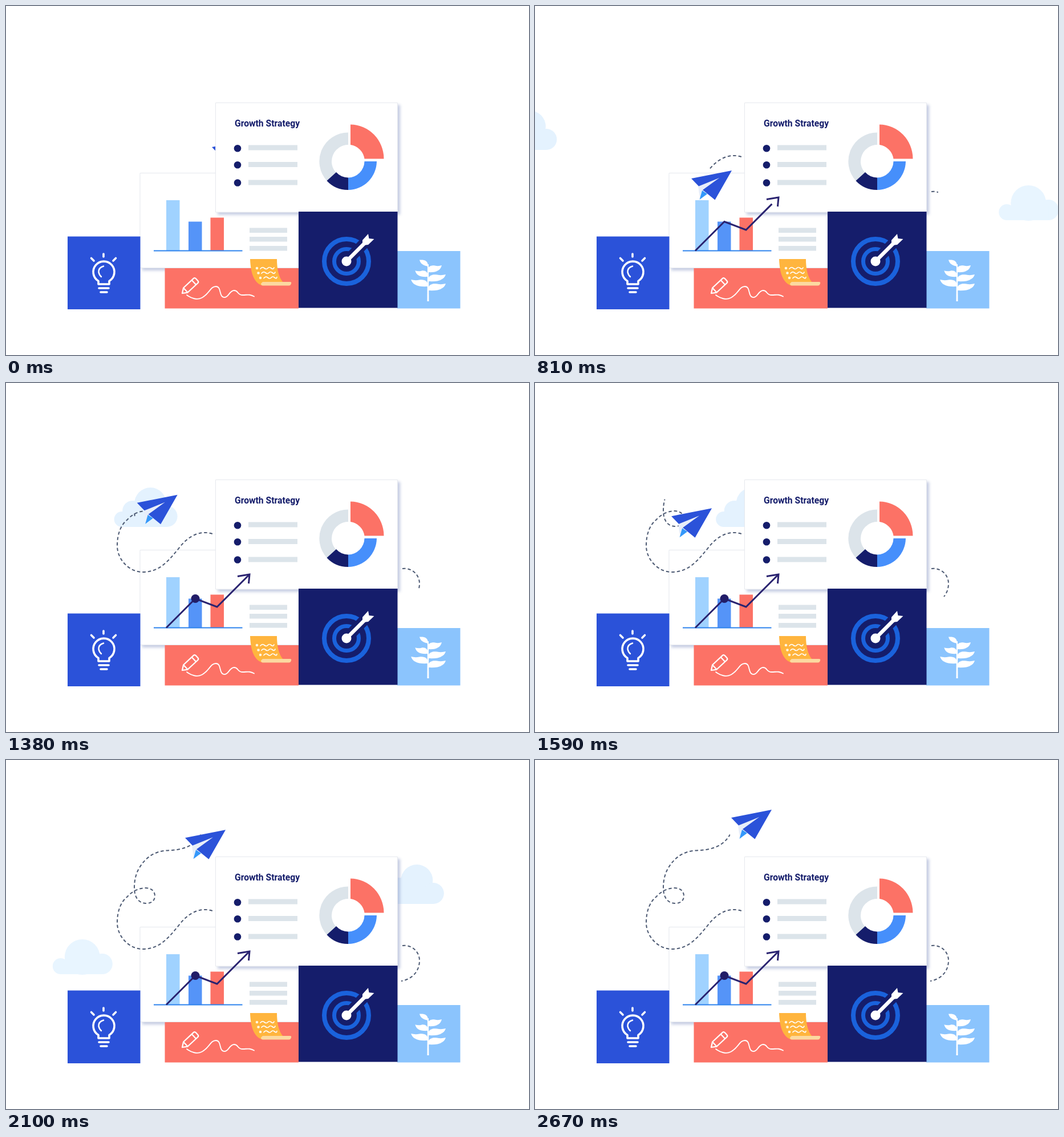
These frames come from a looping animation (917x611 px, 2700 ms). An HTML page:

```html
<!DOCTYPE html>
<html lang="en">
<head>
<meta charset="utf-8">
<title>Growth Strategy</title>
<style>
  html, body { margin: 0; width: 100%; height: 100%; overflow: hidden; background: #fff; }
  svg { display: block; width: 917px; height: 611px; }
  .navy { fill: #151d6b; }
  .red { fill: #fc7266; }
  .grey { fill: #dce4ea; }
  .card { fill: #fff; stroke: #e6e9ee; filter: url(#shadow); }
  .white { fill: none; stroke: #fff; stroke-linecap: round; stroke-linejoin: round; }
  .dash { fill: none; stroke: #4d5a73; stroke-width: 2; stroke-dasharray: 5.5 4; }
  .reveal { fill: none; stroke: #fff; stroke-width: 7; }
  .trend { fill: none; stroke: #2a2370; stroke-width: 3; }
</style>
</head>
<body>
<svg viewBox="0 0 917 611">
  <defs>
    <filter id="shadow" x="-5%" y="-5%" width="112%" height="115%">
      <feDropShadow dx="4" dy="4" stdDeviation="2.500" flood-color="#6f7fb8" flood-opacity=".4"/>
    </filter>
    <path id="route" d="M362 264C343 258 322 265 305 287C285 311 270 331 240 331C215 331 195 308 195 285C195 262 203 247 212 240C222 229 234 224 245 224C256 224 261 231 261 238C261 246 255 251 246 251C234 251 225 242 225 224C225 212 227 203 231 194C238 180 249 168 262 163C275 157 288 159 300 157C318 154 332 147 341 132L345 118"/>
    <path id="arc" d="M695 325C712 323 725 336 725 351C725 370 712 384 693 387"/>
    <mask id="routeMask" maskUnits="userSpaceOnUse" x="0" y="0" width="917" height="611">
      <use href="#route" id="routeReveal" class="reveal"/>
    </mask>
    <mask id="arcMask" maskUnits="userSpaceOnUse" x="0" y="0" width="917" height="611">
      <use href="#arc" id="arcReveal" class="reveal"/>
    </mask>
    <path id="leaf" d="M0 0C-2 -10 5 -13 12 -11.500Q18 -10 24 -12C22 -3 14 1 0 0Z"/>
    <path id="bullets" d="M425 243.500h86v9h-86ZM425 273h86v9h-86ZM425 304.500h86v9h-86Z"/>
  </defs>

  <g id="cloudA" fill="#e4f2fe">
    <circle cx="14" cy="238.500" r="13.500"/><circle cx="33" cy="224" r="18"/>
    <circle cx="64" cy="211" r="28"/><circle cx="93" cy="233.500" r="18.500"/>
    <path d="M14 252V225H93V252Z"/>
  </g>
  <g id="cloudB" fill="#e8f5ff">
    <circle cx="14" cy="361" r="14"/><circle cx="52" cy="345" r="31"/>
    <circle cx="87" cy="357" r="18"/><path d="M14 375V350H87V375Z"/>
  </g>

  <!-- Chart card -->
  <path class="card" d="M235 292.500H513V458.500H235Z"/>
  <path fill="#a0d2ff" d="M281 340H304.500V428H281Z"/>
  <path fill="#5594f8" d="M320 377.500H343.500V428H320Z"/>
  <path class="red" d="M358.500 370.500H382V428H358.500Z"/>
  <path stroke="#2f83ee" stroke-width="2" d="M259 428.500H414.500"/>
  <path class="grey" d="M427 388.500h66v8.500h-66ZM427 404h66v8.500h-66ZM427 420h66v8.500h-66Z"/>

  <!-- Base tiles -->
  <path fill="#2b52d9" d="M108 403.500H235.500V531H108Z"/>
  <path class="red" d="M278.500 459H513V529.500H278.500Z"/>
  <path fill="#8bc4fd" d="M686 429H796.500V529.500H686Z"/>

  <!-- Bulb -->
  <g class="white" stroke-width="3.600">
    <path d="M162 487V481.500A18.500 18.500 0 1 1 181 481.500V487ZM163 494H180M166 501H177"/>
    <path d="M171 434V439M149.500 441.500L154 446M192.500 441.500L188 446"/>
    <path stroke-width="2.500" d="M171 455.500Q162 458 162.500 466Q163.500 471 167 474"/>
  </g>

  <!-- Plant -->
  <g fill="#fff">
    <path d="M738.500 517L739 452H741L741.500 517Z"/>
    <path d="M740 456C740 446 735 444 725 444.500C727 452 732 454 740 456Z"/>
    <use href="#leaf" transform="translate(740 466)"/>
    <use href="#leaf" transform="translate(741 482) scale(1.250 1)"/>
    <use href="#leaf" transform="translate(741 498) scale(1.250 1)"/>
    <use href="#leaf" transform="translate(739 474) scale(-.9 .9)"/>
    <use href="#leaf" transform="translate(739 491) scale(-1.200 1)"/>
  </g>

  <!-- Pencil and scribble -->
  <g class="white" stroke-width="1.800">
    <path d="M317 506C325 512 335 515 343 511C357 504 358 491 368 491C379 491 372 511 384 510C391 509 392 498 400 498C408 498 405 506 415 506C423 506 427 504 435 508.500"/>
    <path stroke-width="2.200" transform="translate(309 503) rotate(-43)" d="M0 0L8 -5.500H32Q35 -5.500 35 -2.500V2.500Q35 5.500 32 5.500H8ZM8 -5.500V5.500M28 -5.500V5.500"/>
  </g>

  <!-- Note -->
  <path fill="#ffb53e" d="M428 443H475C475 460 478 475 486 484L450 489.500C436 486 429 470 428 443Z"/>
  <path fill="#fcd9a0" d="M450 483H498Q501 483 500 486Q499 489.500 496 489.500H451Q447 489.500 447 486Z"/>
  <g fill="#fff6df">
    <circle cx="440" cy="459" r="2.300"/><circle cx="442.500" cy="467.500" r="2.300"/><circle cx="446" cy="476" r="2.300"/>
  </g>
  <path class="white" stroke-width="1.700" d="M446 460q3.500 -4 7 -1t6 0t6 0t5 -1M448 468q3.500 -4 7 -1t6 0t6 0t5 -1M452 476.500q3.500 -4 7 -1t6 0t6 0t4 -1"/>

  <!-- Flight -->
  <use href="#route" class="dash" mask="url(#routeMask)"/>
  <use href="#arc" class="dash" mask="url(#arcMask)"/>
  <g id="plane">
    <path fill="#e8eef9" d="M-59 27L-20 12L-50 38L-56 50Z"/>
    <path fill="#3498fa" d="M-56.500 51L-52 35L-43 41Z"/>
    <path fill="#2b52d9" d="M0 0L-71 14L-58 27.500L-22 13L-51 34L-29.500 51.500Z"/>
  </g>

  <!-- Strategy card -->
  <path class="card" d="M367.500 169.500H686.500V361H367.500Z"/>
  <text class="navy" x="401" y="210.500" font-family="Roboto, Arial, sans-serif" font-weight="700" font-size="15.700">Growth Strategy</text>
  <g class="navy"><circle cx="406" cy="249.300" r="6.300"/><circle cx="406" cy="278.300" r="6.300"/><circle cx="406" cy="309.500" r="6.300"/></g>
  <use href="#bullets" class="grey"/>
  <path class="grey" d="M600 221.500A50.500 50.500 0 0 0 563 306.500L579.500 292.500A29 29 0 0 1 600 243Z"/>
  <path class="navy" d="M562.500 306A50.500 50.500 0 0 0 600 322V300.500A29 29 0 0 1 579 291Z"/>
  <path fill="#468ffb" d="M600 322A50.500 50.500 0 0 0 650 272H628.500A29 29 0 0 1 600 300.500Z"/>
  <path class="red" d="M604 207.500A59 60 0 0 1 662.500 267.500H628.500A29 29 0 0 0 604 243Z"/>

  <!-- Target -->
  <path class="navy" d="M513 360H686.500V528.500H513Z"/>
  <g fill="none" stroke="#1a62dc" stroke-width="8">
    <circle cx="597" cy="447" r="39"/><circle cx="597" cy="447" r="21.500" stroke-width="7"/>
    <path stroke="#151d6b" stroke-width="19" d="M600 444L640 403"/>
  </g>
  <circle cx="597" cy="447" r="8.500" fill="#fff"/>
  <path stroke="#fff" stroke-width="6.500" d="M597 447L631 413"/>
  <path fill="#fff" d="M625 419V410L635 399L636.500 407L645.500 408L635 418Z"/>

  <!-- Trend arrow -->
  <path id="trend" class="trend" d="M281 428.500L332 377.500L370 392L426 336"/>
  <path id="head" class="trend" d="M406 338.500L427 335L425.500 351"/>
  <circle id="dot" fill="#221d68" cx="332" cy="377.500"/>
</svg>
<script>
const LOOP = 2700;
const TRAIL_GAP = 14;  // the route runs on this far past the last dash
const el = id => document.getElementById(id);
const route = el('route');
const routeLength = route.getTotalLength();

const ramp = (t, from, to) => Math.min(Math.max((t - from) / (to - from), 0), 1);
const move = (id, x, y = 0) => el(id).setAttribute('transform', `translate(${x} ${y})`);

function reveal(id, length) {
  el(id).style.visibility = length > 0 ? 'visible' : 'hidden';
  el(id).style.strokeDasharray = `${Math.max(length, 0)} 2000`;
}

function draw(t) {
  // Clouds drift across in opposite directions, slow-fast-slow.
  move('cloudA', -162 + 738 * (1 - Math.cos((t - 271) * 0.000918)));
  move('cloudB', 398 - 578 * Math.sin((t - 1560) * 0.00107));

  // The plane follows the route at constant speed, behind the tip of its trail.
  const spot = route.getPointAtLength(routeLength * ramp(t, 467, 2254));
  move('plane', spot.x + 70, spot.y - 31);
  const trail = 298 + 342 * Math.sin((t - 1350) * 0.00139);
  reveal('routeReveal', Math.min(trail, routeLength - TRAIL_GAP));
  reveal('arcReveal', 100 * ramp(t, 650, 2000));

  reveal('trend', 194 * ramp(t, 300, 860));
  el('head').style.opacity = ramp(t, 740, 800);
  el('dot').setAttribute('r', 7.5 * ramp(t, 1080, 1220));
}

const start = performance.now();
function frame() {
  draw((performance.now() - start) % LOOP);
  requestAnimationFrame(frame);
}
frame();
</script>
</body>
</html>
```
